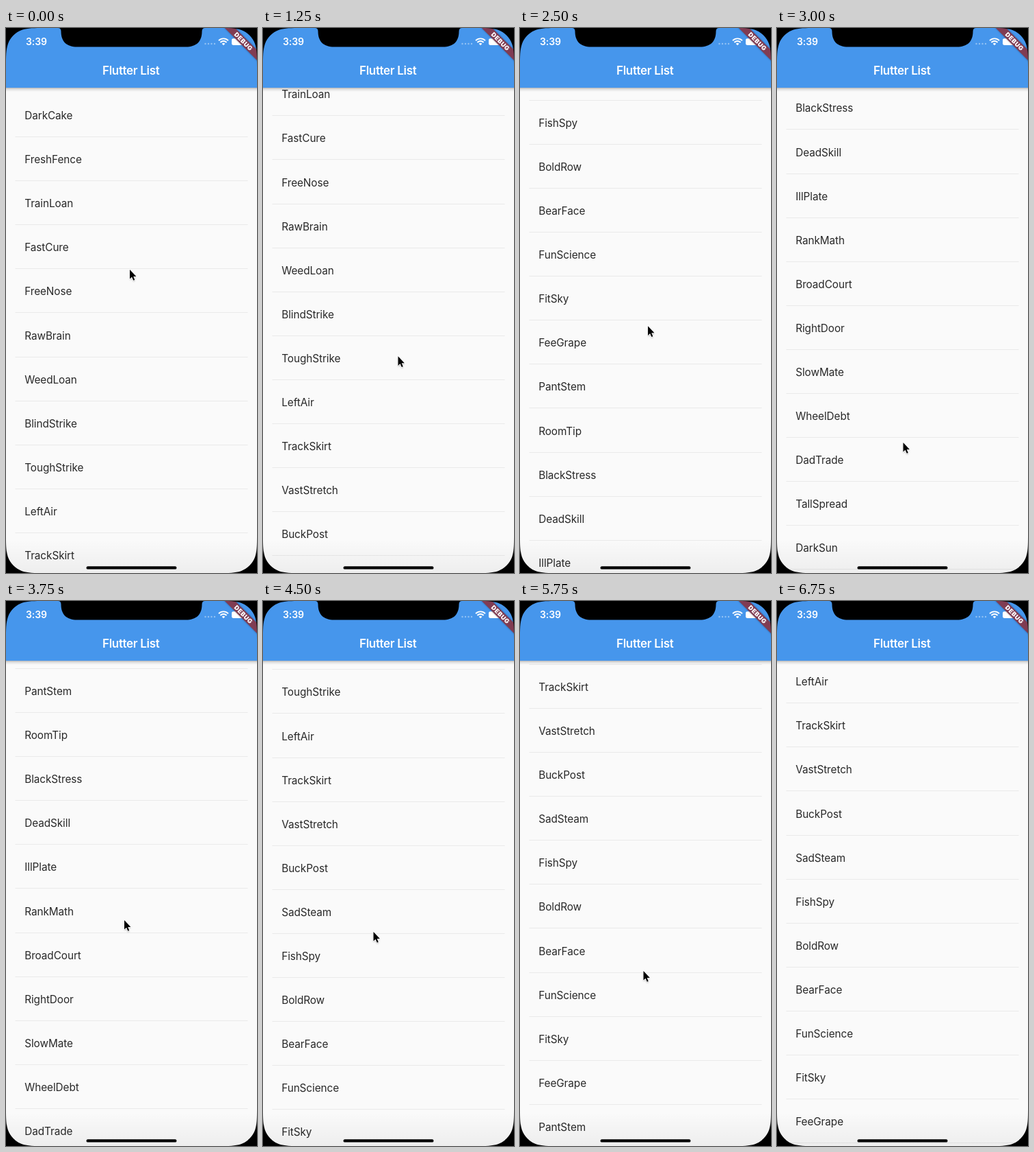
Recreate the animation shown at these times as an HTML page. Size 367x794 px, loop 7.25 s.

```html
<!DOCTYPE html>
<html lang="en">
<head>
<meta charset="utf-8">
<title>Flutter List</title>
<style>
  html, body { margin: 0; width: 100%; height: 100%; overflow: hidden; background: #000; }
  svg { display: block; width: 100vw; height: 100vh; }
  text { font-family: Inter, Roboto, sans-serif; }
  #list text { font-size: 15.3px; letter-spacing: -.06px; fill: #282828; }
  .bar { font-weight: 600; fill: #fff; }
</style>
</head>
<body>
<svg viewBox="0 0 367 794" xmlns="http://www.w3.org/2000/svg">
  <defs>
    <linearGradient id="drop" x2="0" y2="1">
      <stop offset="0" stop-opacity=".26"/>
      <stop offset=".4" stop-opacity=".1"/>
      <stop offset="1" stop-opacity="0"/>
    </linearGradient>
    <linearGradient id="foot" x2="0" y2="1">
      <stop offset="0" stop-opacity="0"/>
      <stop offset="1" stop-opacity=".05"/>
    </linearGradient>
    <filter id="soft" x="-50%" y="-50%" width="200%" height="200%">
      <feGaussianBlur stdDeviation="1.3"/>
    </filter>
    <path id="arrow" d="M0 0V13.6L3 10.7L5.3 15.8L7.3 14.9L5.2 9.9H9.4Z"/>
    <!-- one smooth screen corner, reused for all four -->
    <path id="corner" d="M-1 -1H57V0C40.3 0 32.1 0 23.4 2.8C13.8 6.3 6.3 13.8 2.8 23.4C0 32.1 0 40.3 0 57H-1Z"/>
  </defs>

  <rect width="367" height="794" fill="#fafafa"/>
  <g id="list"></g>
  <rect y="745" width="367" height="49" fill="url(#foot)"/>
  <rect y="87" width="367" height="6" fill="url(#drop)"/>
  <rect width="367" height="87" fill="#4696ec"/>
  <text class="bar" x="182.7" y="68.3" font-size="17" letter-spacing="-.3" text-anchor="middle">Flutter List</text>

  <text class="bar" x="29" y="25.3" font-size="14" letter-spacing="-.1">3:39</text>
  <g stroke="#fff" stroke-width="2.4" stroke-linecap="round" opacity=".4">
    <path d="M291.5 23h0M296 23h0M300.5 23h0M305 23h0"/>
  </g>
  <g fill="#fff">
    <path d="M318 25.3L315.7 22.9A3.3 3.3 0 0 1 320.3 22.9Z"/>
    <rect x="330" y="15.3" width="18" height="9.6" rx="2.6"/>
  </g>
  <g fill="none" stroke="#fff" stroke-width="1.9">
    <path d="M313.4 21A6.4 6.4 0 0 1 322.6 21"/>
    <path d="M311 18.3A9.8 9.8 0 0 1 325 18.3"/>
  </g>

  <g transform="translate(367 0) rotate(45)">
    <rect x="-40" y="22.6" width="80" height="10.7" opacity=".4" filter="url(#soft)"/>
    <rect x="-40" y="22.6" width="80" height="10.7" fill="#803c53"/>
    <text y="31.2" font-size="9" font-weight="900" letter-spacing=".5" text-anchor="middle" fill="#fff">DEBUG</text>
  </g>

  <path d="M76 0Q80.5 0 80.5 5C80.5 20 89 27.5 104 27.5H263C278 27.5 286.5 20 286.5 5Q286.5 0 291 0Z"/>
  <use href="#corner"/>
  <use href="#corner" transform="translate(367 0) scale(-1 1)"/>
  <use href="#corner" transform="translate(0 794) scale(1 -1)"/>
  <use href="#corner" transform="translate(367 794) scale(-1 -1)"/>
  <rect x="117.5" y="784.2" width="132" height="4.4" rx="2.2"/>

  <g id="cursor">
    <use href="#arrow" y="1.5" opacity=".4" filter="url(#soft)"/>
    <use href="#arrow" stroke="#fff" stroke-width="1.6" stroke-linejoin="round"/>
    <use href="#arrow"/>
  </g>
</svg>
<script>
const LOOP = 7250, STEP = 250, LAST = 6750, PITCH = 64.1;
const names = ("DarkCake FreshFence TrainLoan FastCure FreeNose RawBrain WeedLoan BlindStrike " +
  "ToughStrike LeftAir TrackSkirt VastStretch BuckPost SadSteam FishSpy BoldRow BearFace " +
  "FunScience FitSky FeeGrape PantStem RoomTip BlackStress DeadSkill IllPlate RankMath " +
  "BroadCourt RightDoor SlowMate WheelDebt DadTrade TallSpread DarkSun").split(" ");

// Each swipe glides the list by a distance: [start, end, distance]
const swipes = [
  [915, 2000, 699.6], [2250, 3000, 721.1], [3500, 4500, -913.4],
  [5000, 5750, 135.7], [5900, 6750, -56.4]
];
// Turning points of the pointer: [time, position]
const pointerX = [[0, 181], [1250, 197.5], [3000, 184.5], [4500, 161.5], [5750, 180.5], [6750, 192]];
const pointerY = [
  [0, 352], [915, 634], [1500, 378], [2250, 573], [2600, 400], [3000, 604],
  [3500, 330], [4000, 600], [4500, 482], [5000, 590], [5400, 430], [5750, 539], [6750, -48]
];

function ease(t, from, to) {
  const p = Math.max(0, Math.min(1, (t - from) / (to - from)));
  return p * p * (3 - 2 * p);
}

function glide(points, t) {
  return points.reduce((value, [time, pos], i) => {
    if (!i) return pos;
    const [before, last] = points[i - 1];
    return value + (pos - last) * ease(t, before, time);
  }, 0);
}

function add(parent, tag, attrs) {
  const el = document.createElementNS("http://www.w3.org/2000/svg", tag);
  for (const key in attrs) el.setAttribute(key, attrs[key]);
  return parent.appendChild(el);
}

const list = document.getElementById("list");
const cursor = document.getElementById("cursor");
const rows = names.map(name => {
  const row = add(list, "g", {});
  add(row, "text", { x: 27.2, y: 132.9 }).textContent = name;
  add(row, "rect", { x: 13.5, y: 158, width: 340, height: 1, fill: "#eaeaea" });
  return row;
});

function draw(time) {
  const t = Math.min(LAST, Math.floor(time % LOOP / STEP) * STEP);
  const scroll = swipes.reduce((sum, [from, to, way]) => sum + way * ease(t, from, to), 0);
  rows.forEach((row, i) => {
    row.setAttribute("transform", `translate(0 ${Math.round(i * PITCH - scroll)})`);
  });
  cursor.setAttribute("transform", `translate(${glide(pointerX, t)} ${glide(pointerY, t)})`);
}

const start = performance.now();
function tick() {
  draw(performance.now() - start);
  requestAnimationFrame(tick);
}
tick();
</script>
</body>
</html>
```
